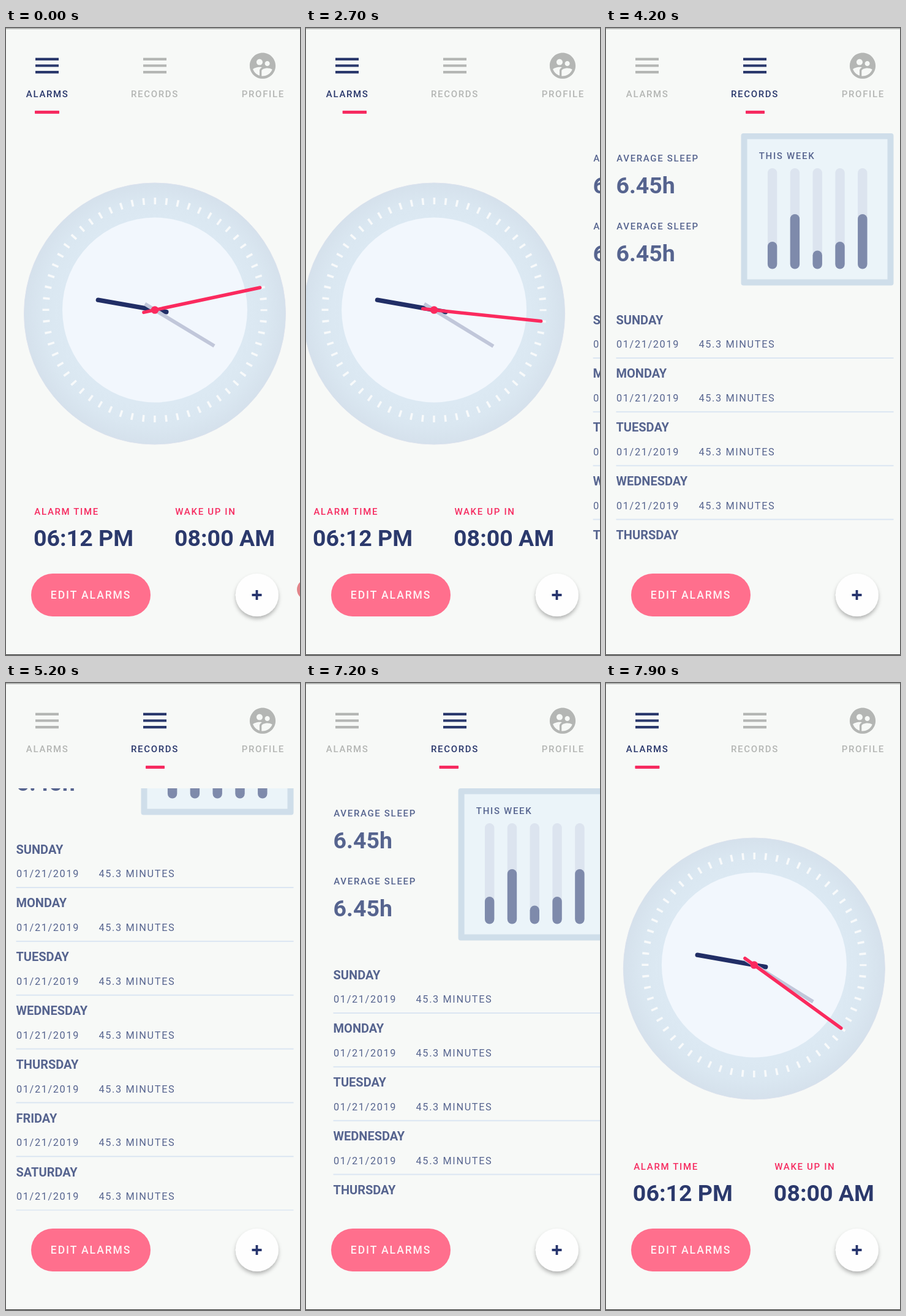
These frames come from a looping animation (480 px wide and 1024 px high, 8 s). An HTML page:

```html
<!DOCTYPE html>
<html lang="en">
<head>
<meta charset="utf-8">
<title>Alarm clock</title>
<style>
html, body { margin: 0; width: 100%; height: 100%; overflow: hidden; background: #f7f9f7; }
svg { display: block; width: 100vw; height: 100vh; font-family: Roboto, sans-serif; }
.tab { fill: #b4b6b4; }
.tab.on { fill: #2a386c; }
.label { font-size: 15px; font-weight: 500; letter-spacing: 1.67px; }
.big { font-size: 37.5px; font-weight: 700; }
.day { font-size: 20px; font-weight: 700; }
.info { font-size: 16.25px; letter-spacing: 1.65px; }
.pink { fill: #f62b60; }
.navy { fill: #2b396c; }
#records { fill: #56648f; }
</style>
</head>
<body>
<svg viewBox="0 0 480 1024">
  <defs>
    <radialGradient id="ring">
      <stop offset=".7" stop-color="#dce9f3"/>
      <stop offset=".86" stop-color="#dae7f1"/>
      <stop offset="1" stop-color="#d5e1ec"/>
    </radialGradient>
    <clipPath id="view"><rect y="172" width="480" height="689.5"/></clipPath>
    <filter id="shadow" x="-30%" y="-30%" width="160%" height="160%">
      <feDropShadow dx="0" dy="4" stdDeviation="3" flood-opacity=".28"/>
    </filter>
    <path id="menu" d="M-19-12.7h38v4.2h-38zM-19-2.1h38v4.2h-38zM-19 8.5h38v4.2h-38z"/>
  </defs>
  <rect width="480" height="1024" fill="#f7f9f7"/>

  <g id="alarms">
    <g transform="translate(243 460.5)">
      <circle cy="6" r="213.5" fill="url(#ring)" stroke="#dce2ee"/>
      <circle r="178" fill="none" stroke="#f8fafb" stroke-width="11" id="ticks"/>
      <circle r="151" fill="#f2f7fd"/>
      <path d="M-19 0H94" transform="rotate(190)" stroke="#212e66" stroke-width="7.5" stroke-linecap="round"/>
      <path id="minute" d="M-19 0H113.5" stroke="#c1c7da" stroke-width="6"/>
      <path id="second" d="M-18.5 0H175.5" stroke="#fb2a5e" stroke-width="5.5" stroke-linecap="round"/>
      <circle r="6.3" fill="#fb2a5e"/>
    </g>
    <text class="label pink" x="46.3" y="794.5">ALARM TIME</text>
    <text class="label pink" x="276.3" y="794.5">WAKE UP IN</text>
    <text class="big navy" x="45" y="846">06:12 PM</text>
    <text class="big navy" x="275" y="846">08:00 AM</text>
  </g>

  <g clip-path="url(#view)"><g id="records"></g></g>

  <g class="tab" id="tab0"><use href="#menu" x="67" y="61.5"/><text class="label" x="32.8" y="112.8">ALARMS</text></g>
  <g class="tab" id="tab1"><use href="#menu" x="243" y="61.5"/><text class="label" x="204" y="112.8">RECORDS</text></g>
  <g class="tab">
    <path transform="translate(393.7 36.4) scale(2.11)" d="M11.99 2c-5.52 0-10 4.48-10 10s4.48 10 10 10 10-4.48 10-10-4.48-10-10-10zm3.61 6.34c1.07 0 1.93.86 1.93 1.93 0 1.07-.86 1.93-1.93 1.93-1.07 0-1.93-.86-1.93-1.93-.01-1.07.86-1.93 1.93-1.93zm-6-1.58c1.3 0 2.36 1.06 2.36 2.36 0 1.3-1.06 2.36-2.36 2.36s-2.36-1.06-2.36-2.36c0-1.31 1.05-2.36 2.36-2.36zm0 9.13v3.75c-2.4-.75-4.3-2.6-5.14-4.96 1.05-1.12 3.67-1.69 5.14-1.69.53 0 1.2.08 1.9.22-1.64.87-1.9 2.02-1.9 2.68zM11.99 20c-.27 0-.53-.01-.79-.04v-4.07c0-1.42 2.94-2.13 4.4-2.13 1.07 0 2.92.39 3.84 1.15-1.17 2.97-4.06 5.09-7.45 5.09z"/>
    <text class="label" x="384.8" y="112.8">PROFILE</text>
  </g>
  <rect id="line" class="pink" y="135" height="5" rx=".8"/>

  <rect x="41" y="891" width="195" height="70" rx="35" fill="#ff6f8d"/>
  <text x="72.8" y="932.2" font-size="17.5" font-weight="500" letter-spacing="1.94" fill="#fff3f5">EDIT ALARMS</text>
  <circle cx="409.8" cy="926" r="35" fill="#fefefe" filter="url(#shadow)"/>
  <path d="M401.5 926h16M409.5 918v16" stroke="#27356e" stroke-width="3.8"/>
  <circle id="touch" cx="492" cy="917" r="17" fill="#e2858a"/>
  <rect width="480" height="2" fill="#b8bab8"/>
  <rect y="1023" width="480" height="1" fill="#2a2c2a"/>
</svg>
<script>
const $ = id => document.getElementById(id);
const set = (id, name, value) => $(id).setAttribute(name, value);
const text = (kind, x, y, s) => `<text class="${kind}" x="${x}" y="${y}">${s}</text>`;
const bar = (x, y, fill) =>
  `<rect x="${x}" y="${y}" width="15.4" height="${393.5 - y}" rx="7.7" fill="${fill}"/>`;

// 60 dashes, the first one centred on three o'clock
const step = 2 * Math.PI * 178 / 60;
set('ticks', 'stroke-dasharray', `3.6 ${step - 3.6}`);
set('ticks', 'stroke-dashoffset', 1.8);

const stats = [0, 111].map(dy =>
  text('label', 17.2, 217.7 + dy, 'AVERAGE SLEEP') + text('big', 16.4, 269.5 + dy, '6.45h'));
const chart = [349, 304, 363.5, 349, 304].map((y, i) => {
  const x = 263.9 + 36.8 * i;
  return bar(x, 229, '#dce4ef') + bar(x, y, '#7e8aab');
});
const days = ['SUN', 'MON', 'TUES', 'WEDNES', 'THURS', 'FRI', 'SATUR'].map((name, i) => {
  const y = 483.5 + 87.85 * i;
  return text('day', 16.5, y, name + 'DAY') +
    text('info', 17, y + 38.7, '01/21/2019') + text('info', 151.5, y + 38.7, '45.3 MINUTES') +
    `<rect x="16.5" y="${y + 54.5}" width="453" height="2" fill="#dbe6f2"/>`;
});
$('records').innerHTML = stats.join('') +
  '<rect x="220.5" y="172" width="249" height="248.5" rx="4" fill="#cfdeea"/>' +
  '<rect x="230.5" y="181.5" width="229" height="229" fill="#ebf4f9"/>' +
  text('label', 249.8, 214, 'THIS WEEK') + chart.join('') + days.join('');

const clamp = u => Math.min(1, Math.max(0, u));
const mix = (a, b, u) => a + (b - a) * u;

const PAGE = 486; // page width, slightly wider than the stage
const DRAG = 40;

// Pixels swiped: a finger drag, then a damped spring over the rest of the page
function swipe(t, start, release) {
  return t < release
    ? DRAG * clamp((t - start) / (release - start)) ** 4.6
    : PAGE - (PAGE - DRAG) * Math.exp(-0.00906 * (t - release));
}

function scroll(t) {
  const down = 1 - (1 - clamp((t - 4400) / 700)) ** 3;
  const up = clamp((t - 5500) / 400) ** 2;
  return 205 * (down - up);
}

function draw(now) {
  const t = Math.floor(now % 8000 / 100) * 100;
  const shift = swipe(t, 2400, 2711) - swipe(t, 6700, 7240);
  const page = shift / PAGE;
  const ticks = Math.floor((t + 500) / 1000);

  set('alarms', 'transform', `translate(${-shift} 0)`);
  set('records', 'transform', `translate(${PAGE - shift} ${-scroll(t)})`);
  set('second', 'transform', `rotate(${-12 + 6 * ticks})`);
  set('minute', 'transform', `rotate(${31.2 + 0.1 * ticks})`);
  set('line', 'x', mix(47, 228, page));
  set('line', 'width', mix(40, 31, page));
  $('tab0').classList.toggle('on', page < 0.5);
  $('tab1').classList.toggle('on', page >= 0.5);
  set('touch', 'visibility', t < 2000 ? 'visible' : 'hidden');
  requestAnimationFrame(draw);
}
draw(performance.now());
</script>
</body>
</html>
```
